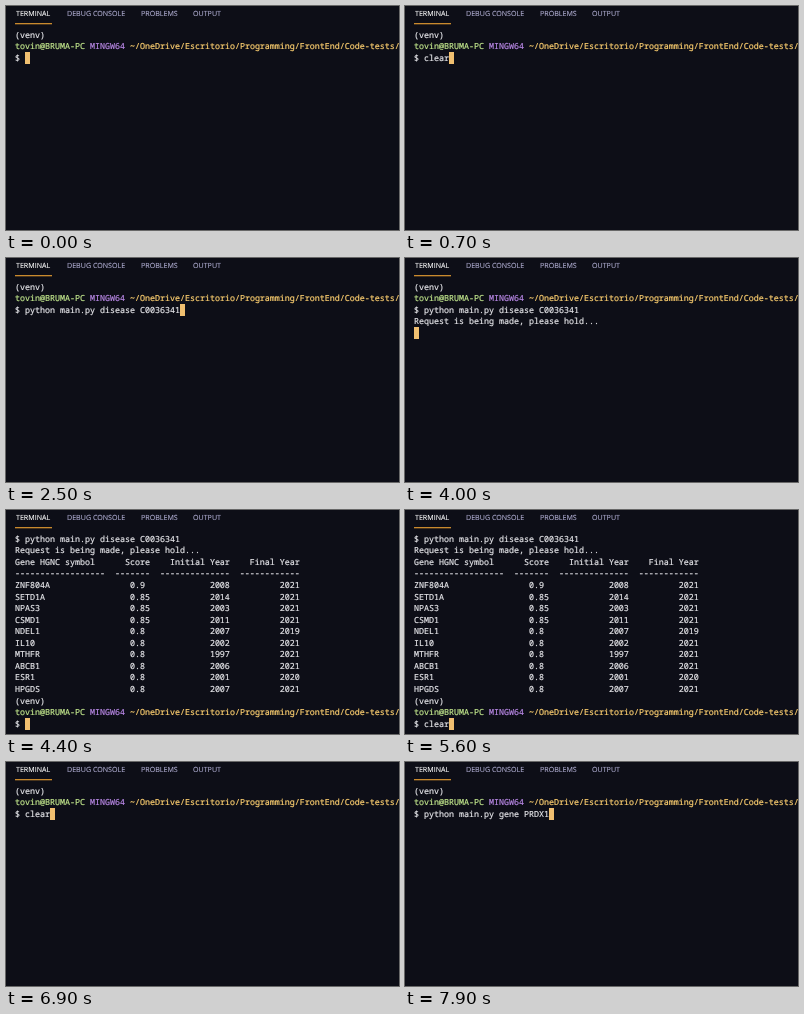
Write an HTML page that moves like this. It is 393 by 224 pixels and loops after 8000 ms.

```html
<!DOCTYPE html>
<html lang="en">
<head>
<meta charset="utf-8">
<title>Terminal session</title>
<style>
  html, body { margin: 0; width: 100%; height: 100%; overflow: hidden; background: #0d0e17; }
  #stage { position: relative; width: 393px; height: 224px; overflow: hidden; text-rendering: geometricPrecision; }
  .tab { position: absolute; top: 3px; font: 7.1px/10px "Open Sans", "Noto Sans", sans-serif; color: #b0aed2; white-space: nowrap; -webkit-text-stroke: .1px; }
  .active { color: #fff; }
  #underline { position: absolute; left: 9px; top: 17px; width: 37px; height: 1px; background: #c98a2e; box-shadow: 0 1px #4a351c; }
  #screen { position: absolute; left: 9px; top: 23.7px; margin: 0; font: 8.333px/11.57px "Noto Sans Mono", monospace; color: #e6e6ea; -webkit-text-stroke: .2px; }
  #cursor { position: absolute; width: 5px; height: 11.57px; background: #f0bf70; }
  .user { color: #c3e88d; }
  .sys { color: #b988e6; }
  .path { color: #ffd070; }
</style>
</head>
<body>
<div id="stage">
  <span class="tab active" style="left:10px">TERMINAL</span>
  <span class="tab" style="left:61px">DEBUG CONSOLE</span>
  <span class="tab" style="left:135px">PROBLEMS</span>
  <span class="tab" style="left:187px">OUTPUT</span>
  <div id="underline"></div>
  <pre id="screen"></pre>
  <div id="cursor"></div>
</div>
<script>
const LOOP = 8000, CHAR = 5, LINE = 11.57, LEFT = 9, TOP = 23;
const screenEl = document.getElementById('screen');
const cursorEl = document.getElementById('cursor');

const prompt = [
  '(venv)',
  '<span class="user">tovin@BRUMA-PC</span> <span class="sys">MINGW64</span> ' +
  '<span class="path">~/OneDrive/Escritorio/Programming/FrontEnd/Code-tests/</span>'
];
const disease = '$ python main.py disease C0036341';
const gene = '$ python main.py gene PRDX1';
const request = 'Request is being made, please hold...';

const row = (name, score, first, last) =>
  name.padEnd(18) + '  ' + score.padStart(7) + '  ' + first.padStart(14) + '  ' + last.padStart(12);

const table = [
  row('Gene HGNC symbol', 'Score', 'Initial Year', 'Final Year'),
  [18, 7, 14, 12].map(n => '-'.repeat(n)).join('  '),
  ...`ZNF804A 0.9 2008 2021
SETD1A 0.85 2014 2021
NPAS3 0.85 2003 2021
CSMD1 0.85 2011 2021
NDEL1 0.8 2007 2019
IL10 0.8 2002 2021
MTHFR 0.8 1997 2021
ABCB1 0.8 2006 2021
ESR1 0.8 2001 2020
HPGDS 0.8 2007 2021`.split('\n').map(line => {
    const [name, score, first, last] = line.split(' ');
    return row(name, score.padEnd(4), first, last);
  })
];
const result = [disease, request, ...table, ...prompt];

// Each step: start time, finished lines, line holding the cursor
const steps = [
  [0, prompt, '$ '],
  [700, prompt, '$ clear'],
  [1600, prompt, disease],
  [2700, [...prompt, disease], ''],
  [3800, [...prompt, disease, request], ''],
  [4300, result, '$ '],
  [4800, result, disease],
  [5200, result, '$ clear'],
  [5800, [], ''],
  [6200, prompt, '$ '],
  [6700, prompt, '$ clear'],
  [7100, prompt, disease],
  [7500, prompt, gene]
];

let shown;
function draw(now) {
  const t = now % LOOP;
  const step = steps.findLast(s => s[0] <= t);
  if (step !== shown) {
    const [, lines, input] = shown = step;
    screenEl.innerHTML = [...lines, input].join('\n');
    cursorEl.style.left = LEFT + input.length * CHAR + 'px';
    cursorEl.style.top = TOP + lines.length * LINE + 'px';
  }
  requestAnimationFrame(draw);
}
draw(0);
</script>
</body>
</html>
```
